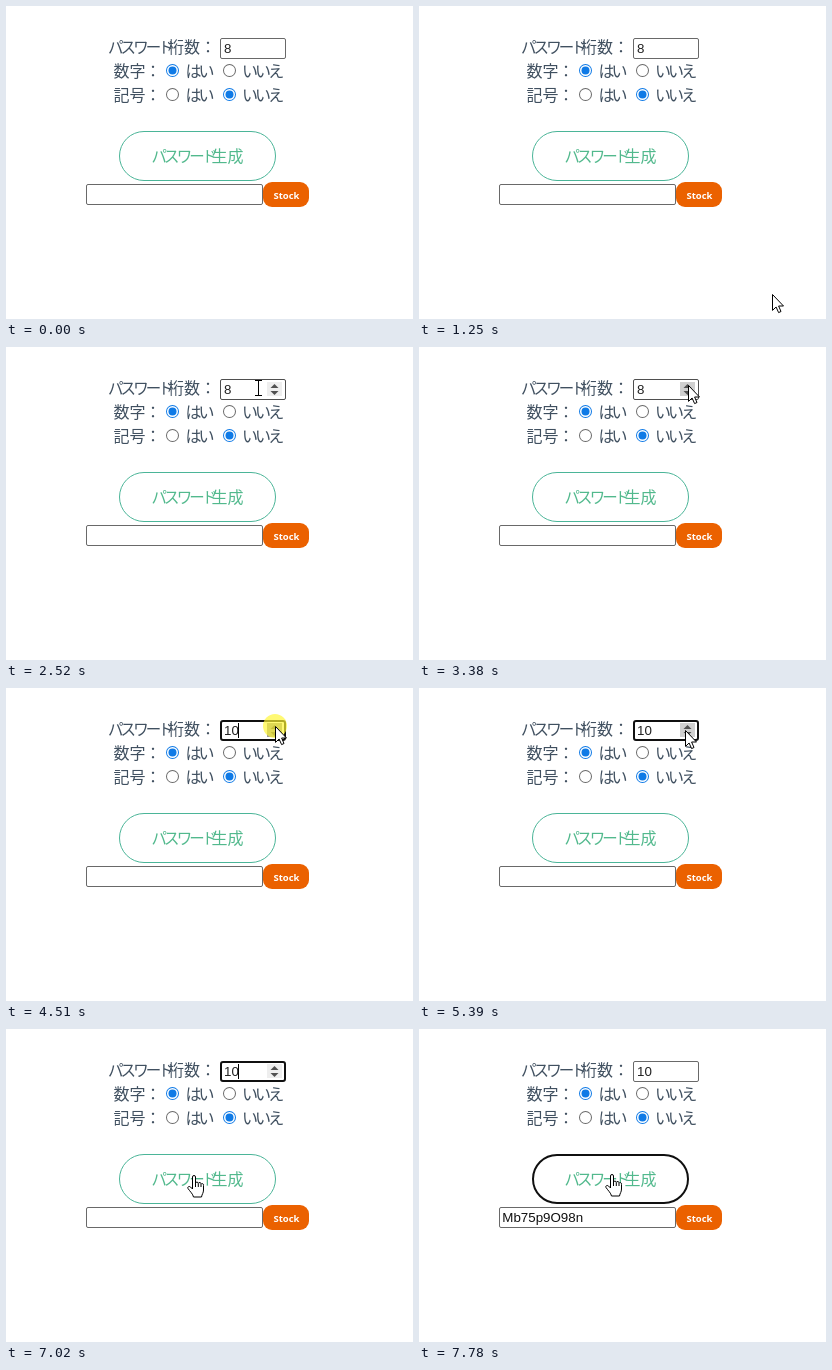
Recreate the animation shown at these times as an HTML page with a canvas. Size 407x313 px, loop 8000 ms.

```html
<!DOCTYPE html>
<html lang="ja">
<head>
<meta charset="utf-8">
<title>パスワード生成</title>
<style>
html, body { margin: 0; width: 100%; height: 100%; overflow: hidden; background: #fff; }
canvas { display: block; }
</style>
</head>
<body>
<canvas id="stage" width="407" height="313"></canvas>
<script>
const ctx = document.getElementById('stage').getContext('2d');
const LOOP = 8000;
const INK = '#405060', GREEN = '#52b98d', BLUE = '#0f7ae6', BLUE_HOVER = '#0a59b8', GRAY = '#696969';
const JP = '"Noto Sans CJK JP", "Noto Sans CJK", sans-serif';
const ARIAL = '13.333px "Liberation Sans", Arial, sans-serif';

// Pointer stops: time, x, y of the hot spot, shape
const STOPS = [
  [1250, 353, 288, 'arrow'],
  [1390, 337, 255, 'arrow'], [1510, 300, 182, 'arrow'],
  [1630, 268, 118, 'arrow'], [1750, 252, 90, 'arrow'],
  [1890, 250, 79, 'arrow'], [2010, 247, 61, 'arrow'],
  [2130, 245, 47, 'beam'], [2250, 244, 42, 'beam'],
  [2520, 252, 41, 'beam'], [2640, 263, 41, 'arrow'], [2770, 269, 41, 'arrow'],
  [3130, 269, 39, 'arrow'], [3380, 269, 38, 'arrow'],
  [5390, 266, 42, 'arrow'], [5510, 262, 46, 'arrow'],
  [6020, 243, 56, 'arrow'], [6140, 222, 67, 'arrow'], [6260, 206, 74, 'arrow'],
  [6400, 204, 74, 'arrow'], [6510, 203, 74, 'arrow'],
  [6650, 200, 84, 'arrow'], [6770, 195, 105, 'arrow'],
  [6900, 190, 130, 'hand'], [7020, 187, 146, 'hand'], [7780, 192, 145, 'hand']
];
const CLICKS = [[4010, 4140], [4510, 4630], [7270, 7390]];

const ARROW = new Path2D('M.5 .5V16.4L4.1 13L6.6 18.6L9 17.5L6.6 12H11.5Z');
const HAND = new Path2D('M5.5 14V2a1.5 1.5 0 0 1 3 0V8.5a1.4 1.4 0 0 1 2.8 0' +
  'a1.4 1.4 0 0 1 2.7 1a1.3 1.3 0 0 1 2.5 1V15c0 3-1.5 4-2 7H6.5' +
  'C6 19 3 16.5 1 13.5C0 12 2.3 10.8 3.5 12Z');

const within = (t, a, b) => t >= a && t < b;
const isClicking = t => CLICKS.some(([a, b]) => within(t, a, b));

function text(str, x, y, font, color, spacing = 0) {
  ctx.font = font;
  ctx.fillStyle = color;
  ctx.letterSpacing = spacing + 'px';
  ctx.fillText(str, x, y);
}

const kanji = (str, x, y, color = INK) => text(str, x, y, '300 16px ' + JP, color);
const hiragana = (str, x, y) => text(str, x, y, '300 16px ' + JP, INK, -2.9);
const katakana = (str, x, y, color = INK) => text(str, x, y, '300 15.5px ' + JP, color, -2.9);

function box(x, y, w, h, r, line, color) {
  ctx.beginPath();
  ctx.roundRect(x + line / 2, y + line / 2, w - line, h - line, r);
  ctx.lineWidth = line;
  ctx.strokeStyle = color;
  ctx.stroke();
}

function disc(x, y, r, color) {
  ctx.beginPath();
  ctx.arc(x, y, r, 0, Math.PI * 2);
  ctx.fillStyle = color;
  ctx.fill();
}

function radio(x, y, checked, hover) {
  const color = checked ? (hover ? BLUE_HOVER : BLUE) : (hover ? '#4f4f4f' : GRAY);
  disc(x, y, 6.5, color);
  disc(x, y, 5.5, '#fff');
  if (checked) disc(x, y, 4, color);
}

function radioRow(label, y, yes, pointer) {
  const inRow = pointer && Math.abs(pointer.y - y) < 12;
  const over = (a, b) => inRow && pointer.x >= a && pointer.x < b;
  kanji(label, 107.5, y + 6);
  kanji('：', 139, y + 6);
  radio(166.5, y, yes, over(160, 209));
  hiragana('はい', 179.5, y + 6);
  radio(223.5, y, !yes, over(217, 277));
  hiragana('いいえ', 236, y + 6);
}

function triangle(x, y, dir) {
  ctx.beginPath();
  ctx.moveTo(x - 4, y);
  ctx.lineTo(x + 4, y);
  ctx.lineTo(x, y - 4 * dir);
  ctx.fill();
}

function numberField(t, pointer) {
  const focus = within(t, 4010, 7270);
  const hover = pointer && pointer.x > 214 && pointer.x < 280 && pointer.y > 32 && pointer.y < 53;
  if (focus) box(214, 32, 66, 21, 2, 2, '#101010');
  else box(214, 32, 66, 21, 1.5, 1, hover ? '#4f4f4f' : GRAY);

  text(t < 4010 ? '8' : t < 4510 ? '9' : '10', 218, 47, ARIAL, '#222');
  if (focus || hover) {
    const onSpinner = hover && pointer.x > 260;
    ctx.fillStyle = !onSpinner ? '#eee' : isClicking(t) ? '#9a9a9a' : '#cfcfcf';
    ctx.fillRect(261, 35, 15, 14);
    ctx.fillStyle = '#505050';
    triangle(268.5, 41, 1);
    triangle(268.5, 44, -1);
  }
  const caret = within(t, 4010, 5020) || within(t, 5510, 6020) || within(t, 6510, 7140);
  if (caret) {
    ctx.fillStyle = '#000';
    ctx.fillRect(t < 4510 ? 225 : 232, 35, 1, 15);
  }
}

function generateButton(t) {
  if (t >= 7270) box(113, 125, 157, 50, 24, 2, '#101010');
  else box(113, 125, 157, 50, 24.5, 1, '#4bb598');
  katakana('パスワード', 145.5, 156, GREEN);
  kanji('生成', 205.5, 156, GREEN);
}

function resultField(t) {
  box(80, 178, 177, 21, 1.5, 1, GRAY);
  if (t >= 7390) text('Mb75p9O98n', 83.3, 193, ARIAL, '#111');
  ctx.beginPath();
  ctx.roundRect(257, 176, 46, 25, 9);
  ctx.fillStyle = '#eb6100';
  ctx.fill();
  text('Stock', 267.4, 193, 'bold 9.5px "Open Sans", sans-serif', '#fff');
}

function drawPointer({ x, y, shape }) {
  ctx.save();
  ctx.lineWidth = 1;
  ctx.strokeStyle = '#000';
  ctx.fillStyle = '#fff';
  if (shape === 'beam') {
    ctx.fillStyle = '#000';
    ctx.fillRect(x, y - 8, 1, 16);
    ctx.fillRect(x - 3, y - 8, 7, 1);
    ctx.fillRect(x - 3, y + 7, 7, 1);
  } else {
    const path = shape === 'hand' ? HAND : ARROW;
    ctx.translate(shape === 'hand' ? x - 6 : x, y);
    ctx.fill(path);
    ctx.stroke(path);
    if (shape === 'hand') {
      ctx.beginPath();
      for (const [lx, top] of [[8.5, 8], [11.3, 8.8], [14, 9.8]]) {
        ctx.moveTo(lx, top);
        ctx.lineTo(lx, 12);
      }
      ctx.stroke();
    }
  }
  ctx.restore();
}

function draw(t) {
  const stop = STOPS.findLast(s => s[0] <= t);
  const pointer = stop && { x: stop[1], y: stop[2], shape: stop[3] };

  ctx.fillStyle = '#fff';
  ctx.fillRect(0, 0, 407, 313);
  katakana('パスワード', 102, 47);
  kanji('桁数', 162, 47);
  kanji('：', 194, 47);
  numberField(t, pointer);
  radioRow('数字', 64.5, true, pointer);
  radioRow('記号', 88.5, false, pointer);
  generateButton(t);
  resultField(t);

  if (isClicking(t)) disc(pointer.x, pointer.y, 12, 'rgba(255, 246, 50, 0.68)');
  if (pointer) drawPointer(pointer);
}

const start = performance.now();
function tick() {
  draw((performance.now() - start) % LOOP);
  requestAnimationFrame(tick);
}
tick();
</script>
</body>
</html>
```
